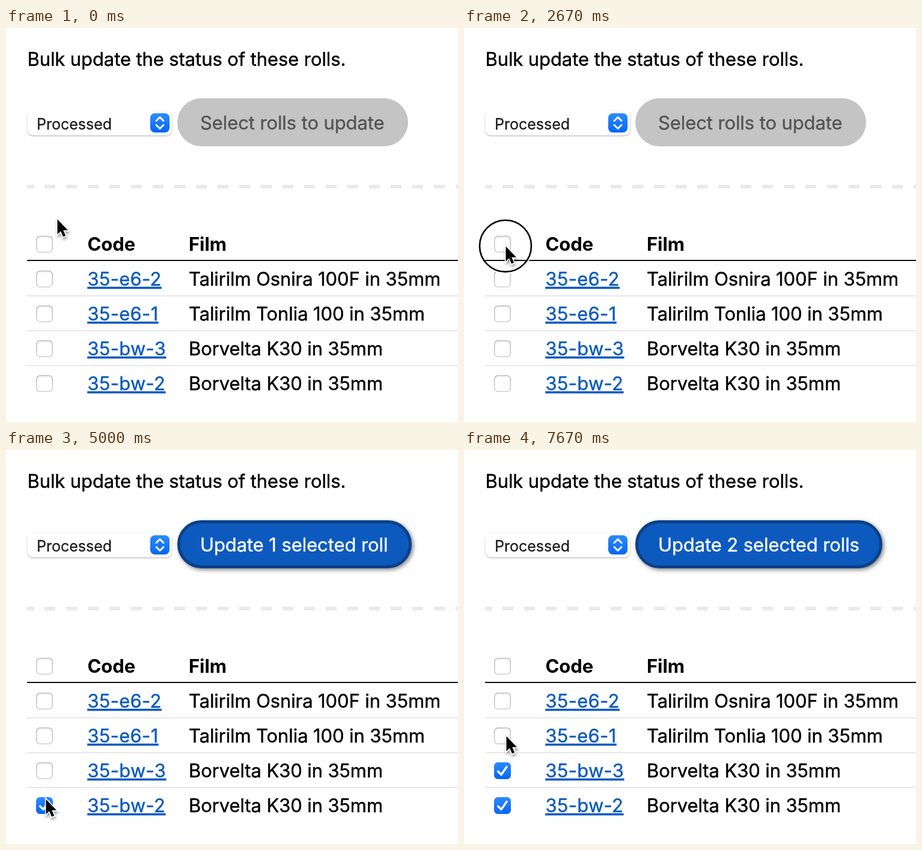
Animation of 752 by 656 pixels, one loop 8000 ms. Source, as an HTML page:

```html
<!DOCTYPE html>
<html lang="en">
<head>
<meta charset="utf-8">
<title>Bulk update</title>
<style>
  html, body { margin: 0; width: 100%; height: 100%; overflow: hidden; background: #fff; }
  svg { display: block; }
  text { font: 31px Inter, "Open Sans", sans-serif; letter-spacing: -0.1px; color: #000; fill: currentColor; stroke: currentColor; stroke-width: .45px; }
  .head { font-weight: 700; stroke: none; }
  .link { color: #0a5abf; letter-spacing: .3px; text-decoration: underline; text-decoration-thickness: 2px; text-underline-offset: 4px; }
  .small { font-size: 25px; letter-spacing: 0; color: #1c1c1c; stroke-width: .3px; }
</style>
</head>
<body>
<svg id="stage" width="752" height="656" viewBox="0 0 752 656">
  <defs>
    <linearGradient id="blue" x2="0" y2="1">
      <stop offset="0" stop-color="#2c8bff"/><stop offset="1" stop-color="#0566f5"/>
    </linearGradient>
    <linearGradient id="rim" x2="0" y2="1">
      <stop offset="0" stop-color="#b4b4b4"/><stop offset="1" stop-color="#cfcfcf"/>
    </linearGradient>
    <filter id="lift" x="-10%" y="-25%" width="120%" height="160%">
      <feDropShadow dx="2.5" dy="2.5" stdDeviation="3.5" flood-opacity=".5"/>
    </filter>
    <filter id="soft" x="-10%" y="-20%" width="120%" height="150%">
      <feDropShadow dx="0" dy="1" stdDeviation="1.3" flood-opacity=".4"/>
    </filter>
    <filter id="drop" x="-50%" y="-30%" width="220%" height="180%">
      <feDropShadow dx="1" dy="3" stdDeviation="2" flood-opacity=".4"/>
    </filter>
  </defs>

  <text x="35.5" y="63">Bulk update the status of these rolls.</text>

  <rect x="35.5" y="138" width="240.5" height="40.5" rx="9" fill="#fff" filter="url(#soft)"/>
  <text class="small" x="51" y="169">Processed</text>
  <rect x="240" y="142" width="32" height="32" rx="7.5" fill="url(#blue)"/>
  <path d="M250 154.5l6-6 6 6M250 161.5l6 6 6-6" fill="none" stroke="#fff" stroke-width="3" stroke-linecap="round" stroke-linejoin="round"/>

  <rect id="button"/>
  <text id="label" x="323" y="168.5"></text>

  <path d="M35 264h12" stroke="#e9e9e9" stroke-width="6"/>
  <path d="M64 264H752" stroke="#e9e9e9" stroke-width="6" stroke-dasharray="18"/>

  <g id="table"></g>

  <g id="ring" fill="none">
    <circle r="45" stroke="#fff" stroke-width="2"/>
    <circle r="43" stroke="#000" stroke-width="2.6"/>
  </g>
  <path id="cursor" d="M.5 1.500v25l5.500-5.200 4 9.300 4.200-1.800-4-9h7.800Z" stroke="#fff" stroke-width="3.200" paint-order="stroke" filter="url(#drop)"/>
</svg>
<script>
const $ = id => document.getElementById(id);
const LOOP = 8000;

const rolls = [
  ["35-e6-2", "Talirilm Osnira 100F in 35mm"],
  ["35-e6-1", "Talirilm Tonlia 100 in 35mm"],
  ["35-bw-3", "Borvelta K30 in 35mm"],
  ["35-bw-2", "Borvelta K30 in 35mm"]
];

// start ms, pointer x, pointer y, ticked rows, pressed
const steps = [
  [0, 85, 317, "0000"],
  [330, 69, 362, "0000"],
  [670, 69, 362, "1111"],
  [2000, 69, 362, "1111", true],
  [2330, 69, 362, "0000"],
  [2670, 69, 362, "0000", true],
  [3000, 69, 384, "1111"],
  [3330, 70, 408, "1111"],
  [3670, 70, 416, "0111"],
  [4000, 71, 474, "0111"],
  [4330, 73, 536, "0011"],
  [5000, 66, 580, "0001"],
  [5330, 66, 600, "0001"],
  [5670, 66, 599, "0000"],
  [6330, 66, 599, "0001"],
  [6670, 67, 561, "0001"],
  [7000, 67, 528, "0001", true],
  [7330, 68, 505, "0011"],
  [7670, 70, 475, "0011"]
];

const buttonWidth = [384, 390, 411, 411, 412];

function set(el, attrs) {
  for (const key in attrs) el.setAttribute(key, attrs[key]);
  return el;
}

function add(parent, tag, attrs, content = "") {
  const el = set(document.createElementNS("http://www.w3.org/2000/svg", tag), attrs);
  el.textContent = content;
  return parent.appendChild(el);
}

// Returns the ticked layer so it can be shown or hidden
function checkbox(y) {
  const box = add($("table"), "g", { transform: `translate(50 ${y})` });
  add(box, "rect", { x: .75, y: .75, width: 26.5, height: 26.5, rx: 6, fill: "#fff", stroke: "url(#rim)", "stroke-width": 1.5 });
  add(box, "path", { d: "M5 2.5H23", stroke: "#eee", "stroke-width": 2 });
  const tick = add(box, "g", {});
  add(tick, "rect", { width: 28, height: 28, rx: 6.5, fill: "url(#blue)" });
  add(tick, "path", { d: "M6.5 15L12 20.5 21 7.5", fill: "none", stroke: "#fff", "stroke-width": 3.4, "stroke-linecap": "round", "stroke-linejoin": "round" });
  return tick;
}

function rule(y, color) {
  add($("table"), "path", { d: `M35 ${y}H752`, stroke: color, "stroke-width": 2 });
}

function row(y, code, film, style) {
  add($("table"), "text", { x: 135.5, y: y + 25, class: style }, code);
  add($("table"), "text", { x: 304, y: y + 25, class: style === "head" ? style : "" }, film);
  return checkbox(y);
}

const headTick = row(346, "Code", "Film", "head");
rule(387, "#111");
const ticks = rolls.map(([code, film], i) => {
  const y = 404 + 58 * i;
  if (i) rule(y - 16, "#e8e8e8");
  return row(y, code, film, "link");
});

function show(el, on) {
  el.style.display = on ? "" : "none";
}

function drawButton(count) {
  const width = buttonWidth[count];
  set($("button"), count
    ? { x: 287.5, y: 119.5, width: width - 5, height: 75, rx: 37.5, fill: "#0a5abf", stroke: "#084086", "stroke-width": 5, filter: "url(#lift)" }
    : { x: 285, y: 117, width, height: 80, rx: 40, fill: "#c4c4c4", stroke: "none", filter: "none" });
  $("label").style.color = count ? "#fff" : "#555";
  $("label").textContent = count
    ? `Update ${count} selected roll${count > 1 ? "s" : ""}`
    : "Select rolls to update";
}

let current;
function draw(now) {
  const time = now % LOOP;
  const step = steps.findLast(s => s[0] <= time);
  if (step !== current) {
    current = step;
    const [, x, y, marks, pressed] = step;
    const count = [...marks].filter(m => m === "1").length;
    ticks.forEach((tick, i) => show(tick, marks[i] === "1"));
    show(headTick, count === rolls.length);
    drawButton(count);
    show($("ring"), pressed);
    set($("ring"), { transform: `translate(${x} ${y + 1})` });
    set($("cursor"), { transform: `translate(${x} ${y})` });
  }
  requestAnimationFrame(draw);
}
draw(0);
</script>
</body>
</html>
```
